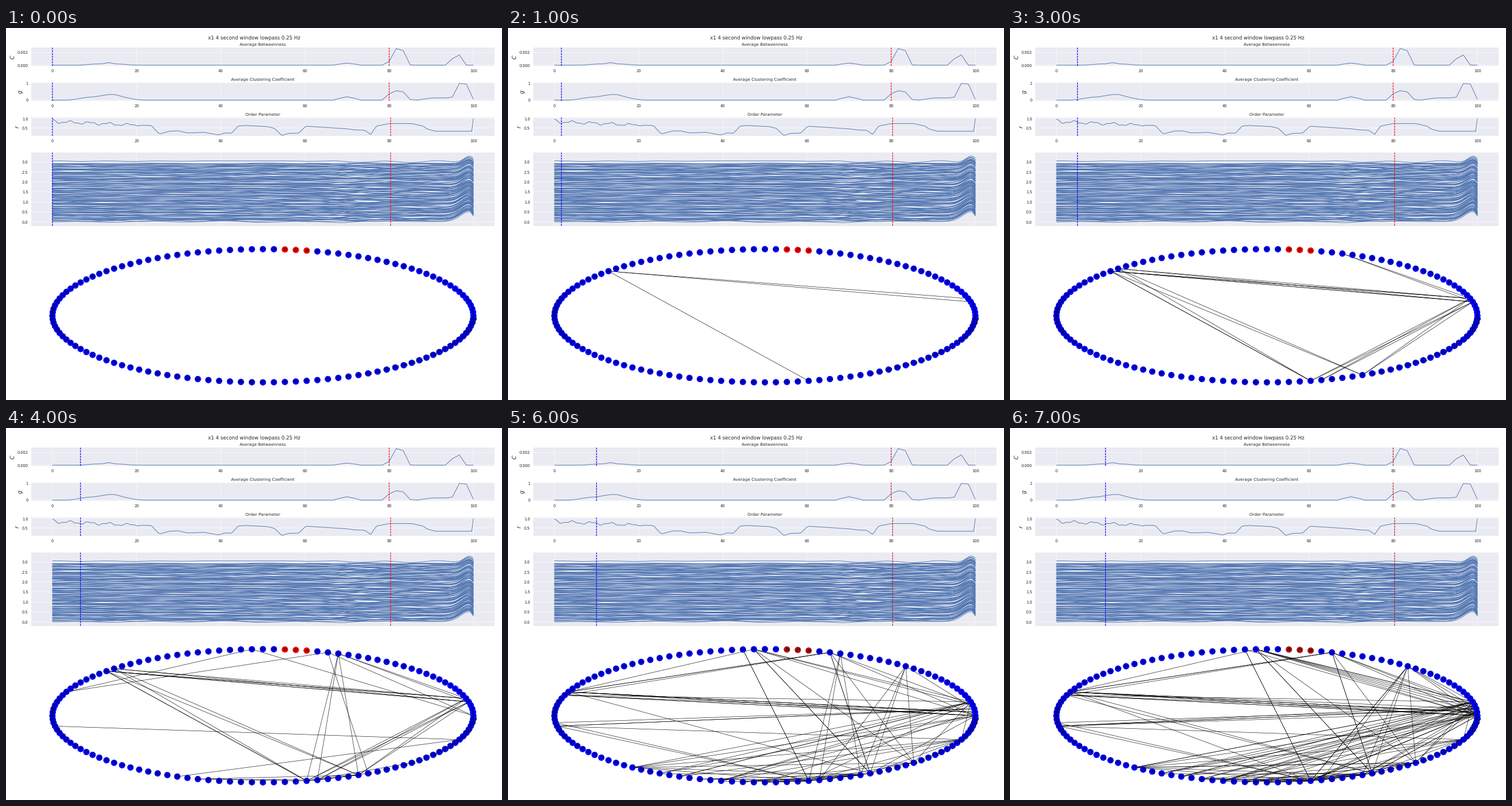
These frames come from a looping animation (864x648 px, 8 s). A matplotlib script:

```python
from itertools import product

import matplotlib.pyplot as plt
import numpy as np
from matplotlib.animation import FuncAnimation
from matplotlib.collections import LineCollection

W, H, DPI = 864, 648, 43.2
N, STEPS = 120, 8
STEP_TIME = 100 / 60
INK, LINE, PANEL = "#262626", "#4C72B0", "#EAEAF2"

plt.rcParams.update({
    "font.family": "DejaVu Sans", "text.color": INK, "text.hinting": "none",
    "axes.labelcolor": INK, "xtick.color": INK, "ytick.color": INK,
    "axes.facecolor": PANEL, "axes.axisbelow": True,
    "grid.color": "white", "grid.linewidth": 1,
    "lines.linewidth": 1.5, "lines.solid_capstyle": "round",
})

rng = np.random.default_rng(4)
fig = plt.figure(figsize=(W / DPI, H / DPI), dpi=DPI, facecolor="white")
fig.suptitle("x1 4 second window lowpass 0.25 Hz", fontsize=14.4)


def panel(top, height):
    left, right = 44.2, 850.8
    return fig.add_axes([left / W, 1 - (top + height) / H,
                         (right - left) / W, height / H])


def chart(top, height, yticks, fmt, title="", label=""):
    ax = panel(top, height)
    ax.set_xlim(-5, 105)
    ax.set_xticks(range(0, 101, 20))
    ax.set_yticks(yticks, [fmt % y for y in yticks])
    ax.tick_params(length=0, pad=9.5, labelsize=11)
    ax.grid(True)
    for line in ax.get_xgridlines() + ax.get_ygridlines():
        line.set_snap(False)
    ax.spines[:].set_visible(False)
    ax.set_title(title, fontsize=12)
    ax.set_ylabel(label, fontsize=16)
    return ax


def bumps(x, *peaks):
    """Sum of flat-topped bumps, each given as centre, height and width."""
    return sum(h * np.exp(-((x - c) / w) ** 4) for c, h, w in peaks)


def cursor(ax, x, color):
    return ax.axvline(x, color=color, lw=2, ls=(0, (2.8, 1.2)), snap=False)


ax_c = chart(34.3, 31.9, [0, .002], "%.3f", "Average Betweenness", "$C$")
ax_g = chart(95.2, 31.9, [0, 1], "%d", "Average Clustering Coefficient", "$g$")
ax_r = chart(156.1, 31.9, [.5, 1], "%.1f", "Order Parameter", "$r$")
ax_p = chart(217, 127.6, np.arange(0, 3.1, .5), "%.1f")
ax_p.tick_params(labelbottom=False)
ax_p.set_ylim(-.19, 3.47)
charts = [ax_c, ax_g, ax_r, ax_p]

# Averages over 60 windows
windows = np.linspace(0, 100, 61)
ax_c.plot(windows, 1e-4 * bumps(windows, (13, 2, 5), (13.3, 2, 1.2), (70, 3.3, 1.9),
                                (82.15, 26, 1.95), (96.2, 16, 1.45)), color=LINE)
ax_g.plot(windows, bumps(windows, (12.5, .2, 6.5), (14, .13, 2.5), (70, .2, 1.9),
                         (81.9, .55, 2.4), (92, .13, 4), (97.45, .98, 1.95)),
          color=LINE)

# Order parameter: key points with a ripple that ends near 23
keys = [(0, .97), (1, .83), (23.5, .62), (25.4, .17), (28, .33), (30, .34),
        (32, .23), (36, .26), (39.5, .12), (41, .23), (42.5, .21), (44.2, .61),
        (46, .63), (51, .57), (52.7, .48), (54.5, .09), (56, .2), (58.5, .22),
        (60.2, .59), (70, .45), (72, .39), (74.2, .37), (75.6, .15), (77, .6),
        (80, .73), (85.4, .73), (88, .6), (89, .44), (91, .32), (99.6, .32),
        (100, 1.01)]
order_x = np.r_[np.arange(0, 99.7, .4), 99.6, 100]
ripple = (.06 * np.cos(2 * np.pi * (order_x - 4.2) / 4.6)
          + .03 * np.sin(2 * np.pi * order_x / 1.9))
fade = np.clip(order_x, 0, 1) * np.clip((24 - order_x) / 8, 0, 1)
ax_r.plot(order_x, np.interp(order_x, *np.array(keys).T) + ripple * fade, color=LINE)

# Phases: near-even levels with a slow wobble, loose near 70, and a final swell
t = np.linspace(0, 100, 401)
levels = np.sort(np.linspace(.03, 2.96, N) + rng.normal(0, .02, N))
levels[[0, -1]] = .02, 3.04
looseness = 1 + .6 / (1 + np.exp((66 - t) / 2)) + .6 * np.exp(-((t - 70) / 3) ** 2)
for level in levels:
    freq = rng.uniform(1, 9, 5)[:, None]
    shift = rng.uniform(0, 2 * np.pi, 5)[:, None]
    wobble = .01 * np.sin(2 * np.pi * freq * t / 100 + shift).sum(axis=0)
    rise = np.where(t < 99, 3 - .4 * level, 1.3)
    swell = (.5 - .07 * level) * np.exp(-((t - 99) / rise) ** 2)
    ax_p.plot(t, level + wobble * looseness + swell, color=LINE)

cursors = [cursor(ax, 0, "blue") for ax in charts]
marks = [cursor(ax, x, "red") for ax, x in zip(charts, [80, 80, 80.33, 80.33])]

# Ring of nodes
ring = panel(373.6, 255.2)
ring.axis("off")
ring.set(xlim=(-1.1, 1.1), ylim=(-1.1, 1.1))
angle = 2 * np.pi * np.arange(N) / N
pos = np.c_[np.cos(angle), np.sin(angle)]
edges = LineCollection([], colors="black", linewidths=1, zorder=1)
ring.add_collection(edges, autolim=False)
nodes = ring.scatter(*pos.T, s=300, linewidths=1, zorder=2)
for k, (x, y) in enumerate(pos):
    ring.text(x, y, str(k), fontsize=12, color="black",
              ha="center", va="center", zorder=3)

# Bundles: first step, last step, and two hubs linked node by node
bundles = [
    (1, 5, [46], [4, 5, 94]), (2, 4, [45, 46], [4, 5]),
    (2, 5, [94, 95, 99], [4, 5]), (2, 5, [23], [4, 5]),
    (3, 5, [45, 46], [94, 99]), (4, 6, [23], [94, 95, 99]),
    (4, 7, [24, 31], [0, 53]), (4, 7, [94, 95], [84, 99]),
    (5, 7, [53, 54], [0, 1, 24]), (5, 7, [24, 31], [3, 100, 105]),
    (5, 7, [16], [95, 99, 105]), (6, 7, [62, 63], [2, 94]),
]

# Later growth: links from any hub to the busy east and south hubs
busy = [0, 1, 2, 3, 4, 94, 99, 100, 105, 113]
others = [16, 24, 31, 32, 53, 54, 63, 77, *range(80, 92, 2)]
growth = list(zip(rng.choice(busy, 96), rng.choice(busy + 2 * others, 96)))


def links_at(step):
    pairs = [pair for first, last, us, vs in bundles
             if first <= step <= last for pair in product(us, vs)]
    return pairs + growth[:6 * max(step - 3, 0) ** 2]


def draw(step):
    red = "#ff0000" if step < 6 else "#b81414"
    for line in cursors:
        line.set_xdata([step * STEP_TIME] * 2)
    for line in marks:
        line.set_color(red)
    nodes.set_color([red if k in (26, 27, 28) else "#0000ff" for k in range(N)])
    edges.set_segments([pos[[a, b]] for a, b in links_at(step)])
    return [*cursors, *marks, nodes, edges]


anim = FuncAnimation(fig, draw, frames=STEPS, init_func=lambda: draw(0),
                     interval=1000, repeat=True, repeat_delay=0)
plt.show()
```
